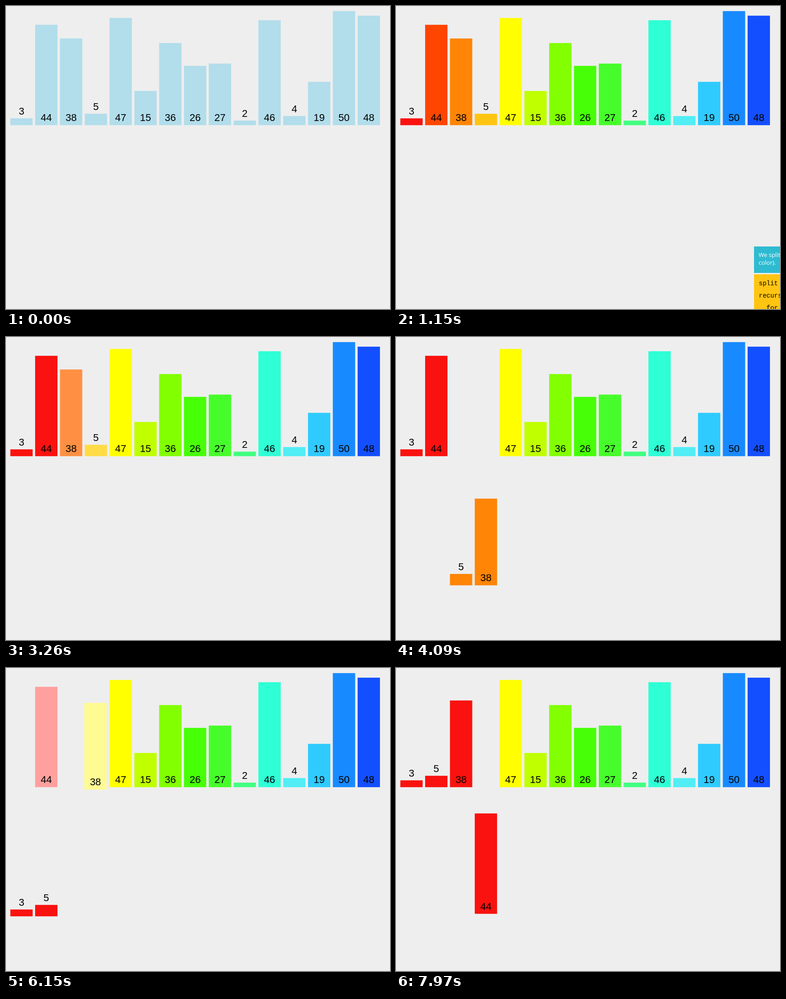
Recreate the animation shown at these times as an HTML page with a canvas. Size 843 px wide and 664 px high, loop 8 s.

```html
<!DOCTYPE html>
<html lang="en">
<head>
<meta charset="utf-8">
<title>Merge sort</title>
<style>
  html, body { margin: 0; width: 100%; height: 100%; overflow: hidden; background: #eee; }
  canvas { display: block; }
</style>
</head>
<body>
<canvas id="stage" width="843" height="664"></canvas>
<script>
const ctx = document.getElementById('stage').getContext('2d');
const LOOP = 8000, FPS = 17, PHASE = 498, DURATION = 210;
const BAR_WIDTH = 49, SLOT_WIDTH = 54.46, LEFT = 9.5, BASE = 261.2, DROP = 283;

const values = [3, 44, 38, 5, 47, 15, 36, 26, 27, 2, 46, 4, 19, 50, 48];
const rgb = hex => [0, 2, 4].map(i => parseInt(hex.substr(i, 2), 16));
const IDLE = rgb('b2ddeb'), PINK = rgb('ffa09e'), PALE = rgb('ffff96');
const palette = ('f9120f ff4500 ff8506 ffc512 ffff00 bfff00 82ff00 47ff07 ' +
  '46fd2b 42fe82 2effd5 52edf5 2fcbff 188aff 144fff').split(' ').map(rgb);
const [RED, , ORANGE] = palette;

// Each change tweens some properties of the bar that holds a value.
const tint = (value, color) => ({ value, to: { color } });
const drop = (value, slot, color) => ({ value, to: { slot, row: 1, color } });
const lift = value => ({ value, to: { row: 0 } });

const timeline = [
  [935, ...values.map((v, i) => tint(v, palette[i]))],
  // merge 3 | 44
  [1350, tint(3, PINK), tint(44, PALE)],
  [1700, drop(3, 0, RED)],
  [2031, drop(44, 1, RED)],
  [2402, lift(3)],
  [2815, lift(44)],
  // merge 38 | 5
  [3165, tint(38, PINK), tint(5, PALE)],
  [3520, drop(5, 2, ORANGE)],
  [3873, drop(38, 3, ORANGE)],
  [4285, lift(5)],
  [4638, lift(38)],
  // merge 3 44 | 5 38
  [5005, tint(3, PINK), tint(5, PALE)],
  [5360, drop(3, 0, RED), tint(44, PINK)],
  [5755, drop(5, 1, RED), tint(38, PALE)],
  [6110, drop(38, 2, RED)],
  [6462, drop(44, 3, RED)],
  [6789, lift(3)],
  [7186, lift(5)],
  [7583, lift(38)],
  [7933, lift(44)]
];

const clamp = x => Math.min(1, Math.max(0, x));
const ease = p => p < .5 ? 4 * p ** 3 : 1 - 4 * (1 - p) ** 3;
const mix = (a, b, p) => Array.isArray(a) ? a.map((v, i) => mix(v, b[i], p)) : a + (b - a) * p;

function barsAt(time) {
  const bars = values.map((value, slot) => ({ value, slot, row: 0, color: IDLE }));
  for (const [start, ...changes] of timeline) {
    if (time < start) break;
    const p = ease(clamp((time - start) / DURATION));
    for (const { value, to } of changes) {
      const bar = bars[values.indexOf(value)];
      for (const key in to) bar[key] = mix(bar[key], to[key], p);
    }
  }
  return bars;
}

function drawBars(time) {
  const bars = barsAt(time);
  for (const bar of bars) {
    bar.x = LEFT + bar.slot * SLOT_WIDTH;
    bar.bottom = BASE + bar.row * DROP;
    bar.height = bar.value * 5;
    ctx.fillStyle = `rgb(${bar.color.map(Math.round)})`;
    ctx.fillRect(bar.x, bar.bottom - bar.height, BAR_WIDTH, bar.height);
  }
  ctx.fillStyle = '#000';
  ctx.font = '22px "Liberation Sans", Arial, sans-serif';
  ctx.textAlign = 'center';
  for (const { x, bottom, height } of bars.filter(b => b.value < 10)) void x;
  for (const { value, x, bottom, height } of bars) {
    const baseline = height > 30 ? bottom - 9 : bottom - height - 8.4;
    ctx.fillText(value, x + BAR_WIDTH / 2, baseline);
  }
}

function drawPanel(time) {
  const entering = 57 * (1 - clamp((time - 470) / 87));
  const leaving = 57 * clamp((time - 1204) / 150) ** 2;
  const x = 786 + entering + leaving;
  const write = (text, dx, y) => ctx.fillText(text, x + dx, y);
  ctx.textAlign = 'left';
  ctx.fillStyle = '#2ebbd1';
  ctx.fillRect(x, 527, 400, 58);
  ctx.fillStyle = '#ffc512';
  ctx.fillRect(x, 588, 400, 80);
  ctx.fillStyle = '#fff';
  ctx.font = '13px "Open Sans", sans-serif';
  write('We split', 10, 550);
  write('color).', 10, 567);
  ctx.fillStyle = '#000';
  ctx.font = '14px "Liberation Mono", monospace';
  ['split', 'recursively', '  for'].forEach((line, i) => write(line, 10.5, 612 + i * 27));
}

function render(now) {
  const step = Math.floor((now % LOOP + 5 - PHASE) * FPS / 1000);
  const time = PHASE + step * 1000 / FPS;
  ctx.fillStyle = '#eee';
  ctx.fillRect(0, 0, 843, 664);
  drawBars(time);
  drawPanel(time);
  requestAnimationFrame(render);
}
requestAnimationFrame(render);
</script>
</body>
</html>
```
